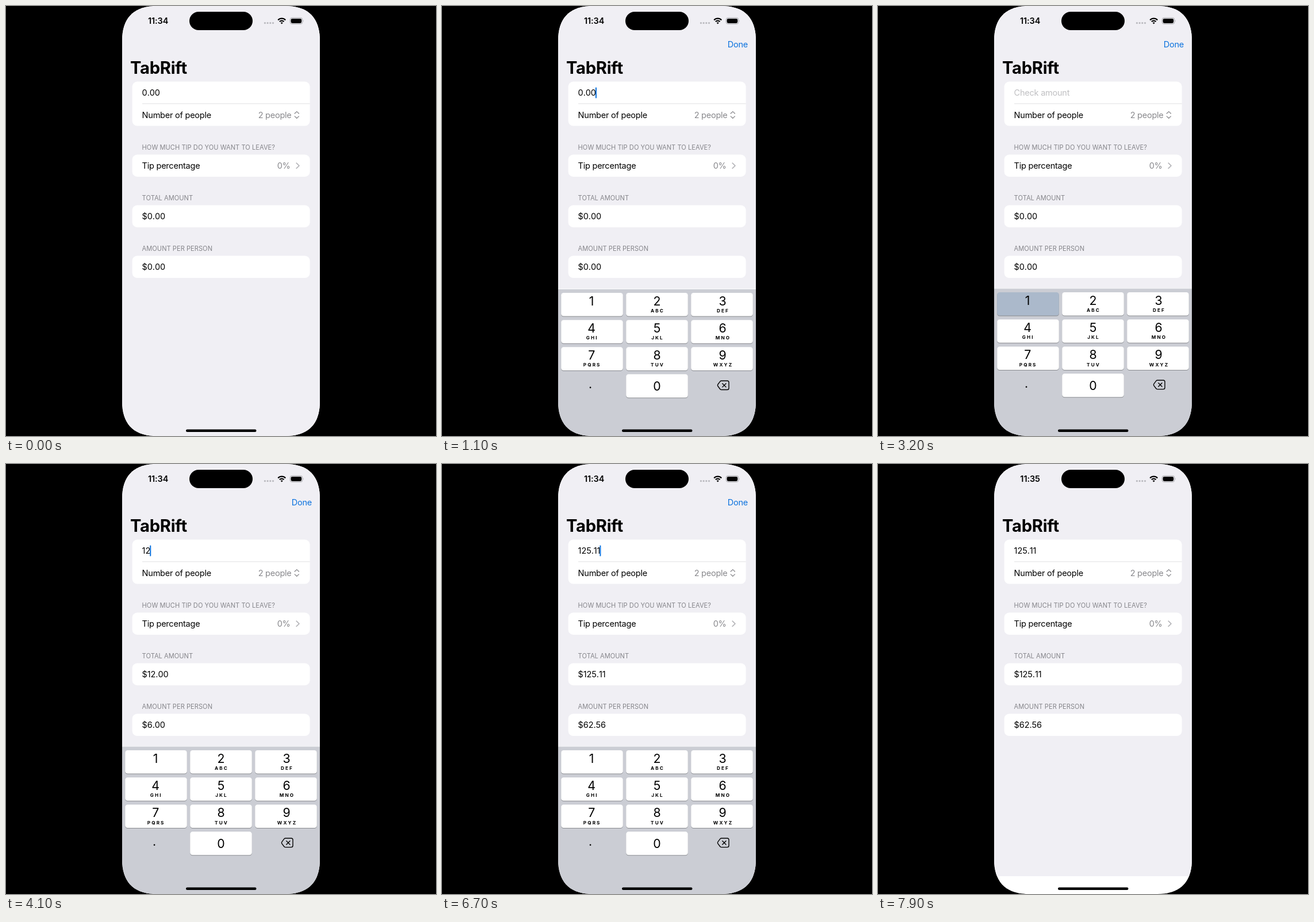
Animation of 748x748 px, one loop 8 s. Source, as an HTML page:

```html
<!DOCTYPE html>
<html lang="en">
<head>
<meta charset="utf-8">
<title>Bill splitter</title>
<style>
  html, body { margin: 0; width: 100%; height: 100%; overflow: hidden; background: #000; }
  svg { display: block; width: 100vw; height: 100vh; }
  text { font-family: Inter, "Liberation Sans", sans-serif; white-space: pre; }
  .body { font-size: 14.5px; letter-spacing: -.23px; }
  .num { font-kerning: none; letter-spacing: -.1px; }
  .head { font-size: 11.1px; letter-spacing: .03px; fill: #85858a; }
  .title { font-size: 29.2px; font-weight: 700; letter-spacing: -.3px; }
  .clock { font-size: 14.5px; font-weight: 600; letter-spacing: -.1px; text-anchor: middle; }
  .end { text-anchor: end; }
  .gray { fill: #88888c; }
  .hint { fill: #bfbfc2; }
  .blue { fill: #0b72de; }
  .digit { font-size: 21.3px; text-anchor: middle; }
  .abc { font-size: 8.2px; font-weight: 700; letter-spacing: 2.1px; text-anchor: middle; }
  .line { fill: none; stroke-linecap: round; stroke-linejoin: round; }
</style>
</head>
<body>
<svg viewBox="0 0 748 748">
  <defs>
    <clipPath id="screen">
      <path d="M262 0H486C525.5 0 546 20.5 546 60V688C546 727.5 525.5 748 486 748H262C222.5 748 202 727.5 202 688V60C202 20.5 222.5 0 262 0Z"/>
    </clipPath>
  </defs>
  <rect width="748" height="748"/>
  <g clip-path="url(#screen)">
    <rect x="202" width="344" height="748" fill="#fff"/>
    <rect id="form" x="202" width="344" height="748" fill="#f0eff4"/>

    <text id="clock" class="clock" x="264.6" y="31.2">11:34</text>
    <rect x="319" y="10" width="110" height="32" rx="16"/>
    <g fill="#b9b9be">
      <circle cx="450.4" cy="29.6" r="1.6"/><circle cx="455.1" cy="29.6" r="1.6"/>
      <circle cx="459.8" cy="29.6" r="1.6"/><circle cx="464.5" cy="29.6" r="1.6"/>
    </g>
    <g fill="none" stroke="#000" stroke-width="2.2">
      <path d="M473.2 24.5A9 9 0 0 1 486.2 24.5"/>
      <path d="M475.9 27.3A5.3 5.3 0 0 1 483.5 27.3"/>
    </g>
    <path d="M477.7 29.3A2.8 2.8 0 0 1 481.7 29.3L479.7 31.4Z"/>
    <rect x="494.1" y="20.4" width="21.8" height="11" rx="3.7" fill="none" stroke="#a6a6aa"/>
    <rect x="495.6" y="21.9" width="18.6" height="8" rx="2.4"/>
    <path d="M516.9 24.2Q518.3 25.9 516.9 27.6Z" fill="#a6a6aa"/>

    <text id="done" class="body blue end" x="532" y="72">Done</text>
    <text class="title" x="216" y="117.6">TabRift</text>

    <g fill="#fff">
      <rect x="219.6" y="131.6" width="309" height="77" rx="8.7"/>
      <rect x="219.6" y="258.4" width="309" height="38.5" rx="8.7"/>
      <rect x="219.6" y="346.4" width="309" height="38.5" rx="8.7"/>
      <rect x="219.6" y="434.5" width="309" height="38.5" rx="8.7"/>
    </g>
    <rect x="237" y="169.4" width="291.6" height="1" fill="#dfdfe2"/>

    <text id="hint" class="body hint" x="236.6" y="156.3">Check amount</text>
    <text id="entry" class="body num" x="236.6" y="156.3">0.00</text>
    <rect id="caret" y="141.4" width="2" height="19" rx="1" fill="#0b72de"/>
    <text class="body" x="236.6" y="195">Number of people</text>
    <text class="body gray end" x="496.6" y="195">2 people</text>
    <path class="line" stroke="#88888c" stroke-width="1.3" d="M502.2 187L505.8 183.6L509.4 187M502.2 191.9L505.8 195.3L509.4 191.9"/>

    <text class="head" x="236.6" y="250">HOW MUCH TIP DO YOU WANT TO LEAVE?</text>
    <text class="body" x="236.6" y="283.2">Tip percentage</text>
    <text class="body gray end" x="494.6" y="283.2">0%</text>
    <path class="line" stroke="#b4b4b8" stroke-width="1.6" d="M505.2 273.2L510 277.8L505.2 282.4"/>

    <text class="head" x="236.6" y="338">TOTAL AMOUNT</text>
    <text id="total" class="body num" x="236.6" y="371.2">$0.00</text>
    <text class="head" x="236.6" y="426">AMOUNT PER PERSON</text>
    <text id="share" class="body num" x="236.6" y="459.2">$0.00</text>

    <g id="pad">
      <rect x="202" y="491.7" width="344" height="257" fill="#cbcdd4"/>
      <g id="keys"></g>
      <text id="dot" class="digit" x="258" y="664.2">.</text>
      <g id="del" class="line" stroke="#000" stroke-width="1.4">
        <path id="tag" d="M486.2 651H496.2Q499 651 499 653.8V663.8Q499 666.6 496.2 666.6H486.2Q484.8 666.6 483.8 665.5L479.9 660.3Q478.8 658.8 479.9 657.3L483.8 652.1Q484.8 651 486.2 651Z"/>
        <path id="cross" d="M487.8 655.7L494 661.9M494 655.7L487.8 661.9"/>
      </g>
    </g>
    <rect x="313" y="736.6" width="122.5" height="4.5" rx="2.25"/>
  </g>
</svg>
<script>
const $ = id => document.getElementById(id);
const LOOP = 8000, STEP = 100, PAD = 256.5, OPEN = 676, CLOSE = 7280;

const letters = ['', 'ABC', 'DEF', 'GHI', 'JKL', 'MNO', 'PQRS', 'TUV', 'WXYZ'];

// [key, down, up]
const taps = [
  ['del', 1600, 1700], ['del', 1800, 1900], ['del', 2000, 2300], ['del', 2400, 2600],
  ['1', 3200, 3300], ['2', 3700, 3800], ['5', 4700, 4800],
  ['.', 5900, 6000], ['1', 6000, 6100], ['1', 6200, 6300]
];
const entries = [
  [0, '0.00'], [1600, '0.0'], [1800, '0.'], [2000, '0'], [2400, ''], [3300, '1'],
  [3800, '12'], [4800, '125'], [6000, '125.'], [6100, '125.1'], [6300, '125.11']
];
const blinks = [
  [0, 0], [700, 1], [2900, .6], [3000, .25], [3100, 0], [3300, 1], [5400, .5],
  [5500, 0], [5900, 1], [6500, .3], [6600, .6], [6700, 1], [7200, .6], [7300, 0]
];

const keyMarkup = (name, col, row) => {
  const x = 207.2 + 113 * col, y = 498 + 47.2 * row, mid = x + 53.8;
  const abc = letters[name - 1];
  const digitX = col === 0 ? mid - .8 : col === 2 ? mid + 1 : mid;
  return `<rect x="${x}" y="${y + 1}" width="107.6" height="40.6" rx="4.4" fill="#898b90"/>
    <rect id="key${name}" x="${x}" y="${y}" width="107.6" height="40.6" rx="4.4" fill="#fff"/>
    <text class="digit" x="${digitX}" y="${y + (row === 3 ? 28.2 : 22)}">${name}</text>` +
    (abc ? `<text class="abc" x="${digitX + 1}" y="${y + 34.1}">${abc}</text>` : '');
};
let markup = keyMarkup('0', 1, 3);
for (let i = 0; i < 9; i++) markup += keyMarkup(String(i + 1), i % 3, Math.floor(i / 3));
$('keys').innerHTML = markup;

const latest = (list, t) => list.filter(e => e[0] <= t).pop()[1];
const clamp = v => Math.max(0, Math.min(1, v));
const money = cents => '$' + (Math.round(cents + 1e-6) / 100).toFixed(2);

// Critically damped spring: share of the way still to go
const left = (ms, rate) => {
  const k = Math.max(0, ms) / 1000 * rate;
  return (1 + k) * Math.exp(-k);
};

function draw(t) {
  const closing = t >= CLOSE;
  const shift = closing ? 1 - left(t - CLOSE, 18.26) : left(t - OPEN, 18.26);
  $('pad').setAttribute('transform', `translate(0 ${PAD * shift})`);

  const gap = closing ? left(t - CLOSE - 50, 6.4) : t >= OPEN ? 1 : 0;
  $('form').setAttribute('height', 748 - PAD * gap);
  $('done').setAttribute('opacity', closing ? 1 - clamp((t - CLOSE) / 200) : clamp((t - OPEN) / 180));
  $('clock').textContent = t < 7500 ? '11:34' : '11:35';

  const text = latest(entries, t), value = Number(text);
  $('entry').textContent = text;
  $('hint').setAttribute('opacity', text ? 0 : 1);
  $('caret').setAttribute('x', 235.7 + (text ? $('entry').getComputedTextLength() : 0));
  $('caret').setAttribute('opacity', latest(blinks, t));
  $('total').textContent = money(value * 100);
  $('share').textContent = money(value * 50);

  const held = taps.filter(([, down, up]) => t >= down && t < up).map(tap => tap[0]);
  for (let i = 0; i < 10; i++) {
    $('key' + i).setAttribute('fill', held.includes(String(i)) ? '#abb9cb' : '#fff');
  }
  const del = held.includes('del');
  $('tag').setAttribute('fill', del ? '#000' : 'none');
  $('cross').setAttribute('stroke', del ? '#cbcdd4' : '#000');
}

let start;
function tick(now) {
  start ??= now;
  const t = (now - start) % LOOP;
  draw(Math.floor(t / STEP) * STEP);
  requestAnimationFrame(tick);
}
draw(0);
requestAnimationFrame(tick);
</script>
</body>
</html>
```
